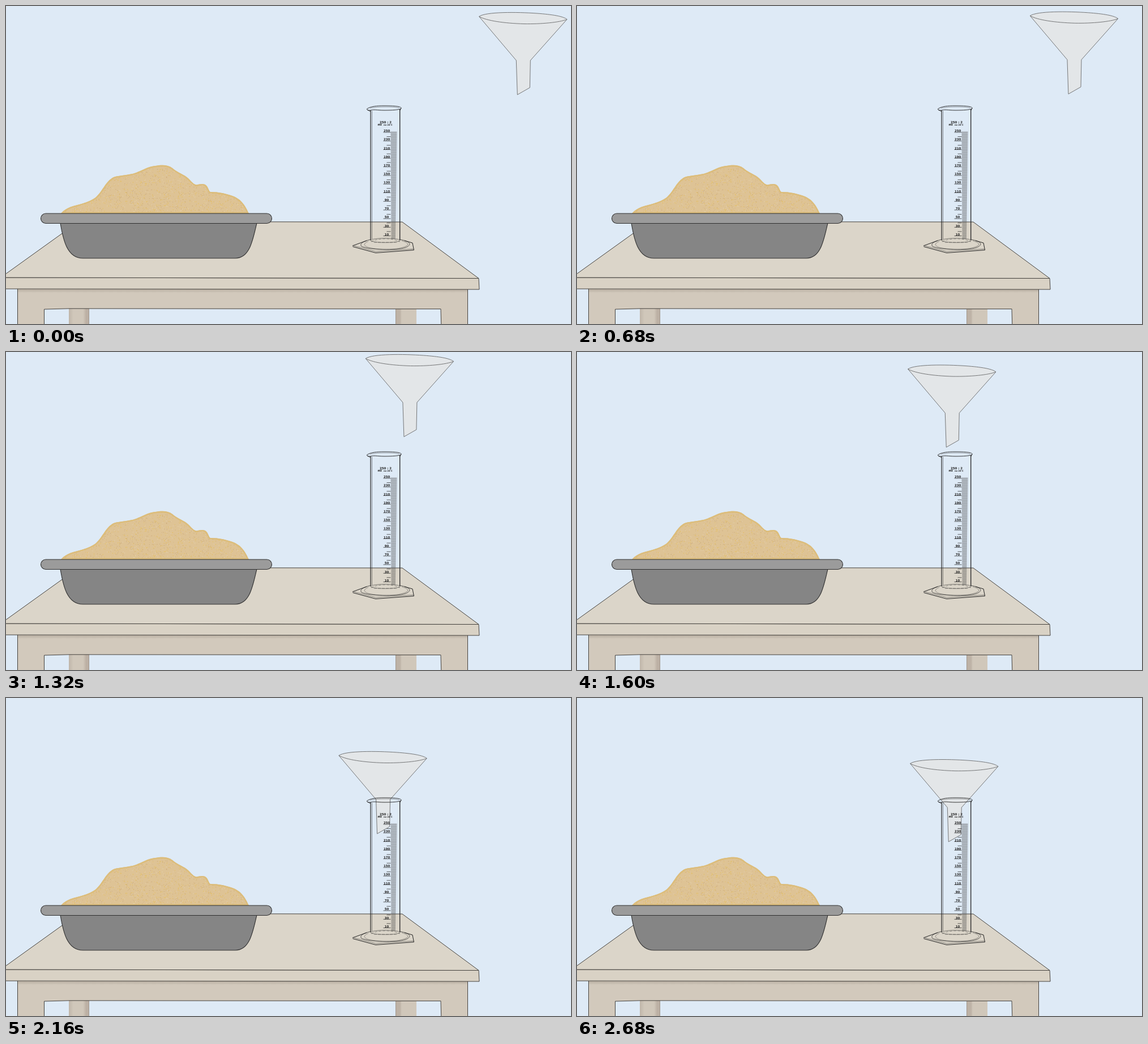
Animation, 998 px wide and 561 px high, one loop 2760 ms. Source, as an HTML page:

```html
<!DOCTYPE html>
<html lang="en">
<head>
<meta charset="utf-8">
<title>Funnel and cylinder</title>
<style>
  html, body { margin: 0; width: 100%; height: 100%; overflow: hidden; background: #deeaf6; }
  svg { display: block; width: 100%; height: 100%; }
  text { font-family: "DejaVu Sans", sans-serif; font-weight: bold; font-size: 5.4px; fill: #222; stroke: none; }
</style>
</head>
<body>
<svg viewBox="0 0 998 561" fill="none" stroke-linejoin="round">
  <defs>
    <linearGradient id="shade" x2="0" y2="1">
      <stop offset="0" stop-color="#b8aea1"/>
      <stop offset="1" stop-color="#d2c9bc"/>
    </linearGradient>
    <linearGradient id="legL">
      <stop offset="0" stop-color="#bfb5a9"/>
      <stop offset=".22" stop-color="#d0c7ba"/>
      <stop offset=".7" stop-color="#d0c7ba"/>
      <stop offset=".85" stop-color="#bcb0a4"/>
      <stop offset="1" stop-color="#bcb0a4"/>
    </linearGradient>
    <linearGradient id="legR">
      <stop offset="0" stop-color="#bcb0a4"/>
      <stop offset=".22" stop-color="#beb3a7"/>
      <stop offset=".3" stop-color="#d0c7ba"/>
      <stop offset="1" stop-color="#d0c7ba"/>
    </linearGradient>
    <path id="heap" d="M97 366C102 360 108 357 114 354.500C128 350 146 347 158 338C170 328 176 309 190 302C200 298.500 216 299 230 294C243 289 253 282.500 264 282C276 280 286 280 294 286C301 292 310 296 316 299.500C325 305 329 314 336 315.500C343 314.500 350 311.500 355 318C358 322 359 329 362 328C376 328 388 331 400 335C418 342 423 354 429 366Z"/>
    <clipPath id="inHeap"><use href="#heap"/></clipPath>
  </defs>
  <rect width="998" height="561" fill="#deeaf6"/>

  <g id="table" stroke="#45423e" stroke-width="1">
    <path d="M111 533H147V561H111Z" fill="url(#legL)" stroke="none"/>
    <path d="M688 533H725V561H688Z" fill="url(#legR)" stroke="none"/>
    <path d="M146.500 534V561M688.500 534V561" stroke="#8f8780" stroke-width=".6"/>
    <path d="M20.500 498V570H67.500V535L112 533.800L768 534.500L769 570H815.500V498Z" fill="#d2c9bc"/>
    <path d="M21 500H815V506H21Z" fill="url(#shade)" stroke="none"/>
    <path d="M-10 479L835 480.500L836 500L-10 499Z" fill="#d9d2c5"/>
    <path d="M-10 479.500L128 380.500L700 381L835 480.500L-10 479Z" fill="#dbd5c9"/>
  </g>

  <g id="sand">
    <use href="#heap" fill="#dec395"/>
    <g id="grains" clip-path="url(#inHeap)"></g>
    <use href="#heap" stroke="#dcbd7b" stroke-width="5" clip-path="url(#inHeap)"/>
  </g>

  <g id="tray" stroke="#303030" stroke-width="1.1">
    <path d="M96 383C101 413 108 445 136 445H405C431 445 436 412 443 383Z" fill="#858585"/>
    <rect x="61.500" y="366" width="408" height="17.500" rx="8.700" fill="#9b9b9b"/>
  </g>

  <g id="funnel" stroke="#68696a" stroke-width=".9">
    <path fill="#e3e6e8" d="M835.600 18.500C848 10 902 10.500 938 13C965 15 984 18 991 23.500L926.300 96L925.300 144L903.300 156.500L901.300 96Z"/>
    <path d="M835.600 18.500C849 26 880 30.500 915 31.500C945 32 978 29 991 23.500"/>
  </g>

  <g id="cylinder" stroke="#222" stroke-width=".9">
    <path d="M612 423L637 414M704 414L718 418L720.500 430.500L653 435.500L612.500 424.500" stroke-width="1"/>
    <path d="M613 422.500L653 433L720 428.500" stroke-width=".45"/>
    <path d="M644 412C630 415 624 420 628 424C640 430 690 432 706 426C718 421 714 415 696 412" stroke-width=".7"/>
    <path d="M640 415C632 419 630 422 640 426C662 431 694 430 706 424C714 420 708 417 699 414" stroke-width=".4"/>
    <ellipse cx="670" cy="413.500" rx="26" ry="3.800" stroke-width=".5"/>
    <path d="M645 416C655 409 685 409 696 416M650 417H690" stroke-width=".4" stroke-dasharray="5 2"/>
    <path d="M644 184V413" stroke-width="1.200"/>
    <path d="M646.500 185V411" stroke-width=".5"/>
    <path d="M695.700 182V413" stroke-width="1.300"/>
    <path d="M637.500 181.500C644 177 655 176 668 176C685 176 698 177 698 180C698 183 685 184 668 184C656 184 650 182 644 184C639 184.500 637 183 637.500 181.500Z"/>
    <path d="M643 180.500C650 177.500 686 177 695 180" stroke-width=".4"/>
    <path d="M698 180L696 184M638 183L644 186"/>
    <path d="M679.500 221.500H690.500L688 411H680.500Z" fill="#777" fill-opacity=".15" stroke="none"/>
    <g id="scale"></g>
    <text x="660" y="206.800">250 : 2</text>
    <text x="656.500" y="211.300">ml</text>
    <text x="667" y="211.300" style="font-size:3.600px">no 20°C</text>
  </g>
</svg>
<script>
const NS = "http://www.w3.org/2000/svg";
const byId = id => document.getElementById(id);

function add(parent, tag, attrs, text) {
  const el = document.createElementNS(NS, tag);
  for (const k in attrs) el.setAttribute(k, attrs[k]);
  if (text) el.textContent = text;
  parent.appendChild(el);
}

// Graduations: a label every 20 ml, a short tick between, fine hatching beside
function drawScale() {
  const g = byId("scale"), step = 15.22;
  let ticks = "", hatch = "";
  for (let i = 0; i <= 12; i++) {
    const y = 222.9 + i * step;
    add(g, "text", { x: 672.6, y: y - .8, "text-anchor": "middle" }, String(250 - 20 * i));
    ticks += `M666.5 ${y}H679.5`;
    if (i < 12) ticks += `M672.5 ${y + step / 2}H679.5`;
  }
  for (let y = 222; y < 411; y += 1.52) {
    const k = (y - 222) / 189;
    hatch += `M${679.5 + k} ${y}H${690.5 - 2.5 * k}`;
  }
  add(g, "path", { d: ticks, "stroke-width": .7 });
  add(g, "path", { d: hatch, "stroke-width": .5, "stroke-opacity": .65 });
}

function drawGrains() {
  let seed = 17;
  const rnd = () => (seed = seed * 16807 % 2147483647) / 2147483647;
  const colors = ["#e8bd45", "#c6a473", "#e6d6b8", "#e2bd62", "#d2b285"];
  const paths = colors.map(() => "");
  for (let i = 0; i < 2000; i++) {
    const x = (97 + rnd() * 332).toFixed(1), y = (281 + rnd() * 85).toFixed(1);
    paths[i % 5] += `M${x} ${y}h1`;
  }
  paths.forEach((d, i) => add(byId("grains"), "path", { d, stroke: colors[i], "stroke-width": 1 }));
}

// Distance travelled along the route: [ms, px]
const keys = [[0, 0], [240, 1.8], [440, 9.5], [560, 19.5], [920, 83], [1120, 137],
  [1320, 200.5], [1680, 288], [1840, 311], [2160, 344], [2240, 349.5], [2440, 356], [2680, 358.2]];
const route = [[0, 0], [-252, -8.8], [-247, 98]];
const firstLeg = Math.hypot(...route[1]);
const secondLeg = Math.hypot(route[2][0] - route[1][0], route[2][1] - route[1][1]);

function slope(i) {
  if (i === 0 || i === keys.length - 1) return 0;
  const [a, b, c] = [keys[i - 1], keys[i], keys[i + 1]];
  const h1 = b[0] - a[0], h2 = c[0] - b[0];
  return ((b[1] - a[1]) / h1 * h2 + (c[1] - b[1]) / h2 * h1) / (h1 + h2);
}

function distance(t) {
  let i = 0;
  while (i < keys.length - 2 && t > keys[i + 1][0]) i++;
  const [t0, s0] = keys[i], [t1, s1] = keys[i + 1];
  const h = t1 - t0, u = (t - t0) / h, v = 1 - u;
  return s0 * v * v * (1 + 2 * u) + s1 * u * u * (3 - 2 * u)
    + h * u * v * (slope(i) * v - slope(i + 1) * u);
}

function place(s) {
  const leg = s < firstLeg ? 0 : 1;
  const k = leg ? Math.min(1, (s - firstLeg) / secondLeg) : s / firstLeg;
  const a = route[leg], b = route[leg + 1];
  return [a[0] + (b[0] - a[0]) * k, a[1] + (b[1] - a[1]) * k];
}

const LOOP = 2760, STEP = 40;
const funnel = byId("funnel");
let start;

function draw(now) {
  start ??= now;
  const t = Math.min(2680, Math.floor((now - start) % LOOP / STEP) * STEP);
  const [x, y] = place(distance(t));
  funnel.setAttribute("transform", `translate(${x.toFixed(2)} ${y.toFixed(2)})`);
  requestAnimationFrame(draw);
}

drawScale();
drawGrains();
requestAnimationFrame(draw);
</script>
</body>
</html>
```
